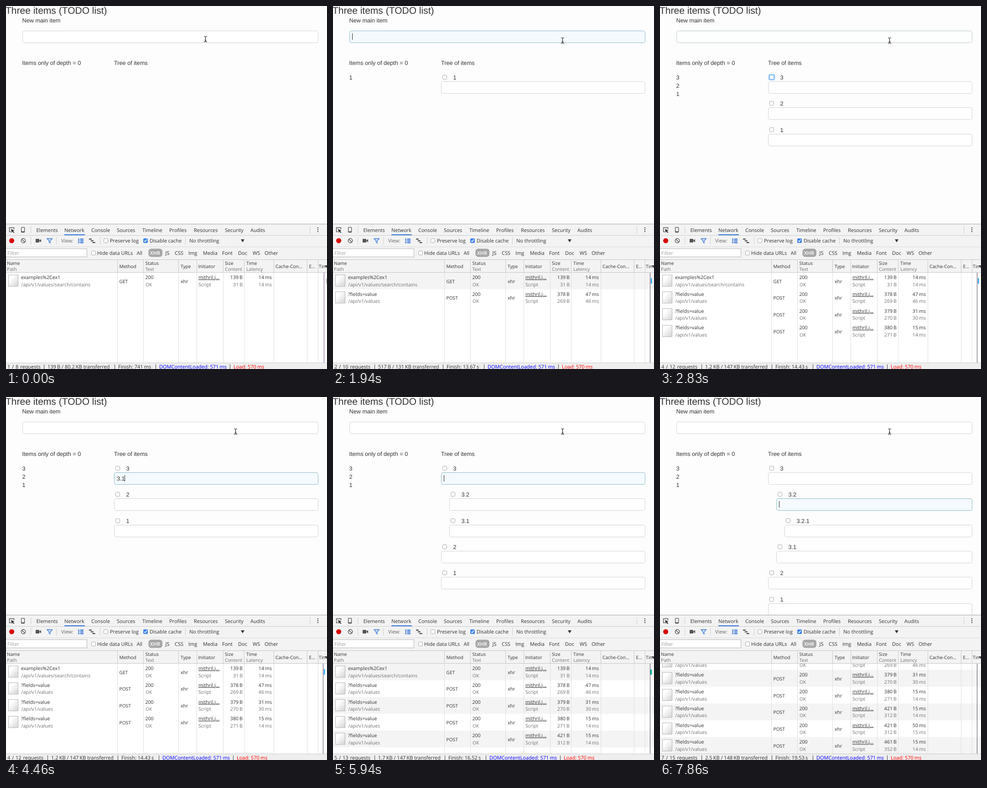
Recreate the animation shown at these times as an HTML page. Size 704 by 795 pixels, loop 8 s.

```html
<!DOCTYPE html>
<html lang="en">
<head>
<meta charset="utf-8">
<title>Three items (TODO list)</title>
<style>
html, body { margin: 0; width: 100%; height: 100%; overflow: hidden; background: #fdfdfd; }
svg { display: block; }
text { white-space: pre; text-rendering: geometricPrecision; }
.page { font: 12.7px "Liberation Sans", Arial, sans-serif; fill: #333; }
.title { font-size: 21px; }
.tool { font: 11px "Open Sans", "Noto Sans", sans-serif; fill: #303030; }
.head { font: 10.2px "Open Sans", "Noto Sans", sans-serif; fill: #303030; }
.cell { font: 10.6px "Open Sans", "Noto Sans", sans-serif; fill: #303030; }
.sub { fill: #707070; }
.link { text-decoration: underline; }
</style>
</head>
<body>
<svg id="stage" width="704" height="795" viewBox="0 0 704 795">
  <defs>
    <linearGradient id="paper" x1="0" y1="0" x2="1" y2="1">
      <stop offset=".3" stop-color="#fff"/><stop offset=".55" stop-color="#eee"/><stop offset="1" stop-color="#d4d4d4"/>
    </linearGradient>
    <clipPath id="pageClip"><rect width="704" height="477"/></clipPath>
    <clipPath id="rowClip"><rect y="584" width="704" height="197"/></clipPath>
  </defs>
  <g id="page" clip-path="url(#pageClip)"></g>
  <g id="tools"></g>
  <g id="rows" clip-path="url(#rowClip)"></g>
  <g id="footer"></g>
</svg>
<script>
const LOOP = 8000, ROW = 36.75, TOP = 583.5;
const COLS = [244.5, 301.5, 378.5, 418.5, 476.5, 522.5, 587.5, 660.5, 684.5];
const $ = id => document.getElementById(id);

const text = (x, y, s, cls, extra = '') => `<text x="${x}" y="${y}" class="${cls}" ${extra}>${s}</text>`;
const rect = (x, y, w, h, fill, extra = '') => `<rect x="${x}" y="${y}" width="${w}" height="${h}" fill="${fill}" ${extra}/>`;
const path = (d, stroke, fill = 'none', extra = '') => `<path d="${d}" stroke="${stroke}" fill="${fill}" ${extra}/>`;
const check = (x, y, border = '#a6a6a6') => rect(x + .5, y + .5, 9, 9, '#fff', `rx="2.2" stroke="${border}"`);

// ---- page ----
function field(x, y, focus, value, caret) {
  const border = ['#d2d2d2', '#c0cace', '#8fb9cb'][focus];
  const fill = ['#fff', '#fdfefe', '#f4fafd'][focus];
  let out = rect(x + .5, y + .5, 684 - x, 26, fill, `rx="4" stroke="${border}"`);
  if (value) out += text(x + 6, y + 17.5, value, 'page');
  if (caret) {
    const w = [...value].reduce((sum, c) => sum + (c === '.' ? .278 : .556) * 12.7, 0);
    out += rect(Math.floor(x + 6 + w), y + 6, 1, 14, '#222');
  }
  return out;
}

function beam(x, y) {
  return path(`M${x - 3.5} ${y - 6}q3 0 3.5 1.5q.5-1.5 3.5-1.5M${x} ${y - 4.5}v9M${x - 3.5} ${y + 6}q3 0 3.5-1.5q.5 1.5 3.5 1.5M${x - 2} ${y + 2.5}h4`,
    '#222', 'none', 'stroke-width="1.2"');
}

function drawPage(s) {
  let out = text(-1, 16.5, 'Three items (TODO list)', 'page title')
    + text(35.5, 35.5, 'New main item', 'page')
    + text(35.5, 129, 'Items only of depth = 0', 'page')
    + text(237, 129, 'Tree of items', 'page');
  const on = s.at === 'main';
  out += field(36, 54, on ? s.glow : s.fade, on ? s.value : '', on && s.caret);
  s.items.filter(n => !n.includes('.')).forEach((n, i) => {
    out += text(35.5, 160.5 + i * 18, n, 'page');
  });
  s.items.forEach((n, i) => {
    const x = 237 + 18 * (n.split('.').length - 1);
    const y = Math.round(165 + 57.3 * i);
    const here = s.at === n, ring = s.at === 'box ' + n;
    if (ring) out += rect(x + .5, y - 16, 15, 14, '#a3cdf8', 'rx="4"');
    out += check(x + 3, y - 14, ring ? '#6aaaf0' : undefined) + text(x + 26.5, y - 4.5, n, 'page')
      + field(x, y, here ? s.glow : 0, here ? s.value : '', here && s.caret);
  });
  $('page').innerHTML = out + beam(...s.mouse);
}

// ---- developer tools ----
function drawTools() {
  const line = (y, c) => rect(0, y, 704, 1, c);
  const bar = (x, y) => rect(x, y, 1, 16, '#ccc');
  let out = rect(0, 477, 704, 318, '#fff') + rect(0, 478, 704, 105, '#f3f3f3')
    + line(477, '#a3a3a3') + line(502, '#ccc') + line(527, '#dadada') + line(555, '#c4c4c4') + line(583, '#c4c4c4');

  // tabs
  out += path('M11 494.5H7.5V485.5H17.5V489', '#555', 'none', 'stroke-width="1.3"')
    + path('M11 488.5l7.5 3-3 1.2 3 3-1.5 1.4-3-3-1.3 2.8z', 'none', '#333')
    + rect(33.6, 484.6, 7, 11, 'none', 'rx="1.2" stroke="#555" stroke-width="1.3"') + rect(34, 493.5, 6, 1.5, '#555')
    + bar(54, 482) + bar(666, 482);
  [['Elements', 66.5], ['Network', 128], ['Console', 187], ['Sources', 243], ['Timeline', 299], ['Profiles', 358],
    ['Resources', 412], ['Security', 480], ['Audits', 536]].forEach(([s, x]) => { out += text(x, 494.5, s, 'tool'); });
  out += rect(128, 500, 45, 2, '#3b79e0');
  for (const y of [486, 490, 494]) out += `<circle cx="684" cy="${y}" r="1.3" fill="#555"/>`;

  // controls
  out += '<circle cx="12.5" cy="514" r="5.5" fill="#d80000"/>'
    + '<circle cx="38" cy="514" r="4.7" fill="none" stroke="#555" stroke-width="1.5"/>' + path('M34.7 510.7l6.6 6.6', '#555', 'none', 'stroke-width="1.5"')
    + rect(65, 510, 8, 8, '#555', 'rx="1"') + path('M73 513.5l4-3v7l-4-3z', 'none', '#555')
    + path('M90 509.5h11.5l-4.5 5v4.5l-2.5-1.5v-3z', '#3b79d8', '#d5e6fa', 'stroke-width="1.3"')
    + bar(54, 506) + bar(110, 506) + bar(206, 506) + bar(393, 506);
  for (let i = 0; i < 3; i++) {
    const y = 509.5 + i * 3.8;
    out += rect(158, y, 3, 2.4, '#3b79d8') + rect(162.5, y, 7.5, 2.4, '#3b79d8') + rect(182 + i * 3.8, y, 6, 2, '#333');
  }
  out += text(121, 518, 'View:', 'tool', 'style="fill:#666"')
    + check(214, 509) + text(228, 518, 'Preserve log', 'tool')
    + rect(301, 509, 10, 10, '#3c82ee', 'rx="2"') + path('M303.3 514l2 2.3 3.5-5', '#fff', 'none', 'stroke-width="1.5"')
    + text(315, 518, 'Disable cache', 'tool') + text(402, 518, 'No throttling', 'tool')
    + path('M515 511h8l-4 6.5z', 'none', '#333');

  // filters
  out += rect(-.5, 531.5, 178, 18, '#fff', 'stroke="#b5b5b5"') + text(3, 545, 'Filter', 'tool', 'style="fill:#a0a0a0"')
    + check(187, 536) + text(200, 545, 'Hide data URLs', 'tool')
    + rect(312.5, 531.5, 30.5, 18, '#a6a6a6', 'rx="6"') + text(316, 544.5, 'XHR', 'tool', 'style="fill:#fff;font-weight:600"');
  [['All', 286.5], ['JS', 349.5], ['CSS', 370], ['Img', 400], ['Media', 432], ['Font', 474], ['Doc', 509], ['WS', 541], ['Other', 567]]
    .forEach(([s, x]) => { out += text(x, 544.5, s, 'tool'); });

  // column heads
  [['Name', 2, 'Path'], ['Method', 248.5], ['Status', 305.5, 'Text'], ['Type', 383], ['Initiator', 421.5],
    ['Size', 480, 'Content'], ['Time', 527, 'Latency'], ['Cache-Con…', 591], ['E…', 664.5], ['Tim', 686]].forEach(([s, x, below]) => {
    out += text(x, below ? 567 : 573.5, s, 'head');
    if (below) out += text(x, 579.5, below, 'head sub');
  });
  out += path('M699 568h5v4h-2.5z', 'none', '#444');
  for (const x of COLS) out += rect(x - .5, 556, 1, 27, '#c8c8c8');
  $('tools').innerHTML = out;
}

// size, content, time, latency
const CALLS = [[139, 31, 14, 14], [378, 269, 47, 46], [379, 270, 31, 30], [380, 271, 15, 14],
  [421, 312, 15, 14], [421, 312, 50, 15], [461, 352, 15, 14]];

function drawRows(n) {
  const scroll = Math.max(0, n * ROW - 198);
  const striped = n === 2 || n === 5 || n === 7;
  const end = 'text-anchor="end"';
  let out = rect(0, 583, 704, 198, '#fff');
  CALLS.slice(0, n).forEach(([size, content, time, wait], i) => {
    const y = TOP + i * ROW - scroll;
    const a = y + 14.5, b = y + 30, mid = y + 23;
    if (striped && i % 2 === 0) out += rect(0, y, 704, ROW, '#f4f4f4');
    out += rect(5.5, y + 5.5, 21, 25, 'url(#paper)', 'stroke="#b4b4b4"')
      + path(`M6 ${y + 24}l20-9`, '#fff', 'none', 'stroke-opacity=".7"')
      + text(33, a, i ? '?fields=value' : 'examples%2Cex1', 'cell')
      + text(33.5, b, i ? '/api/v1/values' : '/api/v1/values/search/contains', 'cell sub')
      + text(248.5, mid, i ? 'POST' : 'GET', 'head')
      + text(305.5, a, '200', 'cell') + text(306, b, 'OK', 'head sub')
      + text(383, mid, 'xhr', 'cell')
      + text(422, a, 'mithril.j…', 'cell link') + text(422, b, 'Script', 'cell sub')
      + text(519, a, size + '\u2009B', 'cell', end) + text(519, b, content + '\u2009B', 'cell sub', end)
      + text(583, a, time + '\u2009ms', 'cell', end) + text(583, b, wait + '\u2009ms', 'cell sub', end);
  });
  for (const x of COLS) out += rect(x - .5, 583, 1, 198, '#dedede');
  if (n === 1) out += rect(697, 583, 1, 198, '#7d4b8e') + rect(703, 597, 1, 11, '#777');
  else {
    out += rect(695, 583, 1, 198, '#5a4a5e');
    if (n < 5) out += rect(697, 596, 2.5, 12, '#1e9fe8');
    else if (n === 5) out += rect(696, 597, 3.5, 11, '#12b5a5');
    else if (n === 6) out += rect(695, 583.5, 4, 2.5, '#1e9fe8');
  }
  $('rows').innerHTML = out;
}

// requests, transferred, finish, and where the later parts begin
const TOTALS = [
  ['1 / 8', '139\u2009B / 80.2\u2009KB', '741\u2009ms', 91, 246, 336],
  ['2 / 10', '517\u2009B / 131\u2009KB', '13.67\u2009s', 99, 249, 339],
  ['3 / 11', '896\u2009B / 139\u2009KB', '14.05\u2009s', 99, 249, 339],
  ['4 / 12', '1.2\u2009KB / 147\u2009KB', '14.43\u2009s', 99, 253, 343],
  ['5 / 13', '1.7\u2009KB / 147\u2009KB', '16.52\u2009s', 99, 253, 343],
  ['6 / 14', '2.1\u2009KB / 148\u2009KB', '17.76\u2009s', 99, 253, 343],
  ['7 / 15', '2.5\u2009KB / 148\u2009KB', '19.53\u2009s', 99, 253, 343]
];

function drawFooter(n) {
  const [count, moved, finish, x1, x2, x3] = TOTALS[n - 1];
  let out = rect(0, 781, 704, 14, '#eee') + rect(0, 781, 704, 1, '#ccc')
    + text(3, 793.5, count + ' requests', 'tool', 'word-spacing="1"')
    + text(x1, 793.5, moved + ' transferred', 'tool')
    + text(x2, 793.5, 'Finish: ' + finish, 'tool')
    + text(x3, 793.5, 'DOMContentLoaded: 571\u2009ms', 'tool', 'style="fill:#00f"')
    + text(x3 + 163, 793.5, 'Load: 570\u2009ms', 'tool', 'style="fill:#f00"');
  for (const x of [x1, x2, x3, x3 + 163]) out += rect(x - 8, 785, 1, 10, '#444');
  $('footer').innerHTML = out;
}

// ---- script: each step changes part of the state ----
const list = s => s.split(' ');
const type = value => ({ value, caret: true });
const enter = items => ({ items: list(items), value: '', caret: true });
const focus = at => ({ at, glow: 1, caret: true, value: '' });
const STEPS = [
  [0, { mouse: [437.5, 72.5], items: [], at: '', glow: 0, fade: 0, value: '', caret: false, calls: 1 }],
  [150, { mouse: [443.5, 73.5] }],
  [300, { mouse: [460.5, 75.5] }],
  [450, { mouse: [484.5, 76.5] }],
  [600, { mouse: [503.5, 75.5] }],
  [750, focus('main')],
  [900, { glow: 2 }],
  [1200, { caret: false }],
  [1500, type('1')],
  [1800, enter('1')],
  [1940, { calls: 2 }],
  [2090, type('2')],
  [2240, enter('2 1')],
  [2380, { calls: 3, ...type('3') }],
  [2530, enter('3 2 1')],
  [2680, { calls: 4 }],
  [2830, { at: 'box 3', fade: 1, caret: false }],
  [2980, { ...focus('3'), fade: 0 }],
  [3120, { glow: 2 }],
  [3570, { caret: false }],
  [4020, { caret: true }],
  [4170, type('3')],
  [4310, type('3.')],
  [4460, type('3.1')],
  [4610, enter('3 3.1 2 1')],
  [4750, { calls: 5 }],
  [5190, type('3')],
  [5340, type('3.')],
  [5640, type('3.2')],
  [5940, enter('3 3.2 3.1 2 1')],
  [6080, { calls: 6 }],
  [6230, { at: 'box 3.2', caret: false }],
  [6380, focus('3.2')],
  [6520, { glow: 2 }],
  [6670, type('3')],
  [6970, type('3.')],
  [7120, type('3.2')],
  [7270, type('3.2.')],
  [7410, type('3.2.1')],
  [7560, enter('3 3.2 3.2.1 3.1 2 1')],
  [7710, { calls: 7 }]
];
const states = [];
for (const [, change] of STEPS) states.push({ ...states[states.length - 1], ...change });

let shown = -1, calls = 0;
function show(t) {
  const next = STEPS.findIndex(([at]) => at > t);
  const i = (next < 0 ? STEPS.length : next) - 1;
  if (i === shown) return;
  shown = i;
  const s = states[i];
  drawPage(s);
  if (s.calls !== calls) {
    calls = s.calls;
    drawRows(calls);
    drawFooter(calls);
  }
}

drawTools();
show(0);
const start = performance.now();
(function tick() {
  show((performance.now() - start) % LOOP);
  requestAnimationFrame(tick);
})();
</script>
</body>
</html>
```
